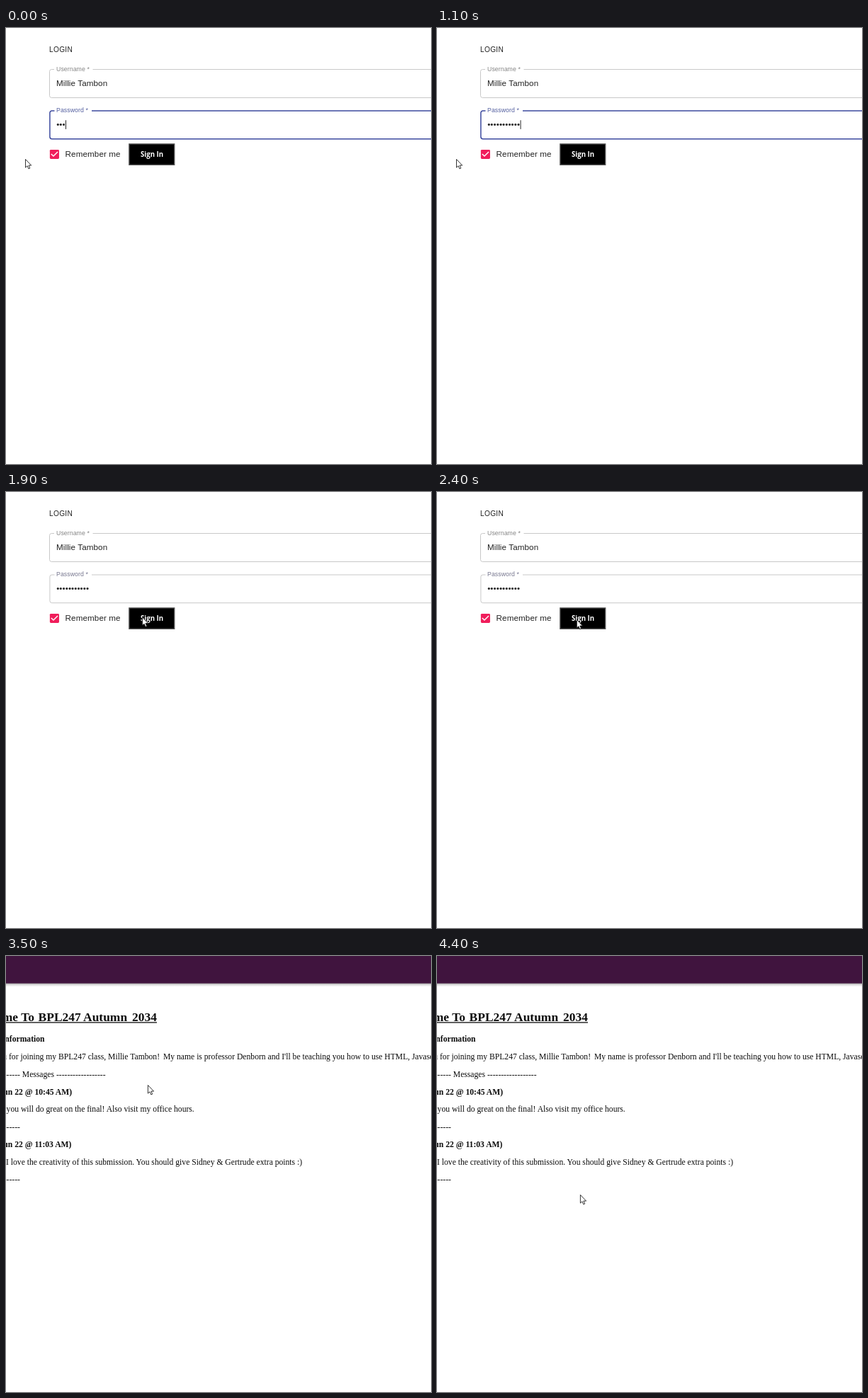
Animation, 600 px wide and 616 px high, one loop 4.5 s. Source, as an HTML page:

```html
<!DOCTYPE html>
<html lang="en">
<head>
<meta charset="utf-8">
<title>Login</title>
<style>
  html, body { margin: 0; width: 100%; height: 100%; overflow: hidden; background: #fff; }
  svg { display: block; width: 600px; height: 616px; }
  text { white-space: pre; }
  .sans { font: 11.63px "Liberation Sans", Arial, sans-serif; letter-spacing: .109px; fill: #222; }
  .label { font-size: 8.72px; letter-spacing: .082px; fill: #858585; }
  .caps { font-size: 10.17px; letter-spacing: .29px; }
  .button { font: bold 9.69px "Open Sans", "Noto Sans", sans-serif; fill: #fff; }
  .serif { font: 11.63px "Liberation Serif", "Times New Roman", serif; fill: #0c0c0c; }
  .bold { font-weight: bold; }
  .title { font-size: 17.44px; }
  .field { fill: none; stroke: #c2c2c2; stroke-width: .9; }
</style>
</head>
<body>
<svg viewBox="0 0 600 616">
  <defs>
    <linearGradient id="shade" x1="0" y1="0" x2="0" y2="1">
      <stop offset="0" stop-color="#000" stop-opacity=".42"/>
      <stop offset=".4" stop-color="#000" stop-opacity=".14"/>
      <stop offset="1" stop-color="#000" stop-opacity="0"/>
    </linearGradient>
  </defs>

  <g id="login">
    <text class="sans caps" x="61" y="33.7">LOGIN</text>

    <path class="field" d="M122.5 58.5H620V98.5H64.4a2.9 2.9 0 0 1-2.9-2.9V61.4a2.9 2.9 0 0 1 2.9-2.9H68"/>
    <text class="sans label" x="71" y="61.2">Username *</text>
    <text class="sans" x="71" y="82.2">Millie Tambon</text>

    <path id="box" class="field" d="M121 117H620V156.7H64.8a2.9 2.9 0 0 1-2.9-2.9V119.9a2.9 2.9 0 0 1 2.9-2.9H68.5"/>
    <text id="label" class="sans label" x="71" y="119.4">Password *</text>
    <text id="dots" class="sans" x="71.2" y="140.4"></text>
    <rect id="caret" y="130.3" width=".9" height="12.6" fill="#111"/>

    <g transform="translate(59.7 169.7) scale(.7265)">
      <rect x="3" y="3" width="18" height="18" rx="2" fill="#f01d5b"/>
      <path d="M5.7 11.3L10 15.6L18.3 7.3" fill="none" stroke="#fff" stroke-width="2"/>
    </g>
    <text class="sans" x="83.6" y="182.2">Remember me</text>

    <rect x="173.9" y="163.9" width="63.8" height="29.4" fill="#000" stroke="#505050" stroke-width="1.4"/>
    <text class="button" x="206" y="182.2" text-anchor="middle">Sign In</text>
  </g>

  <g id="course">
    <rect y="38.5" width="600" height="5" fill="url(#shade)"/>
    <rect width="600" height="38.7" fill="#40143e"/>
    <text class="serif bold title" x="-50.7" y="92">Welcome To <tspan x="45.6">BPL247 Autumn</tspan><tspan x="178.1">2034</tspan></text>
    <rect y="93.3" width="213" height="1.3" fill="#0c0c0c"/>
  </g>

  <path id="cursor" d="M0 0V11.6L2.6 9.3L4.4 13.4L6.3 12.6L4.5 8.6H8.2Z" fill="#fff" stroke="#111" stroke-width=".85"/>
</svg>

<script>
const LOOP = 4500, STEP = 100, PAGE_AT = 2500, BLUR_AT = 1800;
const el = id => document.getElementById(id);
const [login, course, box, label, dots, caret, cursor] =
  ["login", "course", "box", "label", "dots", "caret", "cursor"].map(el);

// Paragraphs on an even line grid: [x, text, bold, second part, its x]
const dashes = "-".repeat(18);
const lines = [
  [-6.2, "Information", true],
  [-49, "Thank you for joining my BPL247 class, Millie Tambon!", false,
    "My name is professor Denborn and I'll be teaching you how to use HTML, Javascript", 222],
  [-49.8, `${dashes} Messages ${dashes}`],
  [-3.7, "un 22 @ 10:45 AM)", true],
  [.6, "you will do great on the final! Also visit my office hours."],
  [-49.8, dashes],
  [-3.7, "un 22 @ 11:03 AM)", true],
  [0, "I love the creativity of this submission. You should give Sidney & Gertrude extra points :)"],
  [-49.8, dashes]
];

function addText(x, y, words, bold) {
  const node = document.createElementNS("http://www.w3.org/2000/svg", "text");
  node.setAttribute("x", x);
  node.setAttribute("y", y);
  node.setAttribute("class", bold ? "serif bold" : "serif");
  node.textContent = words;
  course.appendChild(node);
}

lines.forEach(([x, words, bold, rest, restX], i) => {
  const y = 121.3 + i * 24.77;
  addText(x, y, words, bold);
  if (rest) addText(restX, y, rest, bold);
});

// Typed characters: [time, count]
const typed = [[0, 3], [100, 4], [200, 5], [400, 6], [500, 8], [800, 9], [900, 10], [1000, 11]];

// Pointer tip: [time, x, y]
const route = [
  [1200, 27.5, 185.5], [1300, 42, 185], [1400, 88, 182], [1500, 140, 179], [1600, 180, 177.5],
  [1700, 192.5, 177], [1900, 192.5, 177], [2400, 197.3, 180.5], [3400, 197.3, 180.5],
  [3500, 200.4, 182.5], [3700, 212, 176], [3900, 229, 168.5], [4000, 234, 167],
  [4100, 238, 190], [4200, 230, 250], [4300, 212, 315], [4400, 202.4, 337.5]
];

function pointerAt(t) {
  const next = route.findIndex(p => p[0] > t);
  if (next === 0) return route[0].slice(1);
  if (next < 0) return route[route.length - 1].slice(1);
  const a = route[next - 1], b = route[next];
  const k = (t - a[0]) / (b[0] - a[0]);
  return [a[1] + (b[1] - a[1]) * k, a[2] + (b[2] - a[2]) * k];
}

function draw(now) {
  const t = Math.floor((now % LOOP) / STEP) * STEP;
  const onLogin = t < PAGE_AT, focused = t < BLUR_AT;
  login.style.display = onLogin ? "" : "none";
  course.style.display = onLogin ? "none" : "";

  const count = typed.filter(p => p[0] <= t).pop()[1];
  dots.textContent = "•".repeat(count);
  caret.setAttribute("x", 71.4 + count * 4.2);
  caret.style.display = t < 1500 ? "" : "none";

  box.style.stroke = focused ? "#3c4a9f" : "";
  box.style.strokeWidth = focused ? 1.5 : "";
  label.style.fill = focused ? "#5560a0" : "#77778f";

  cursor.setAttribute("transform", `translate(${pointerAt(t)})`);
}

const start = performance.now();
function tick() {
  draw(performance.now() - start);
  requestAnimationFrame(tick);
}
tick();
</script>
</body>
</html>
```
